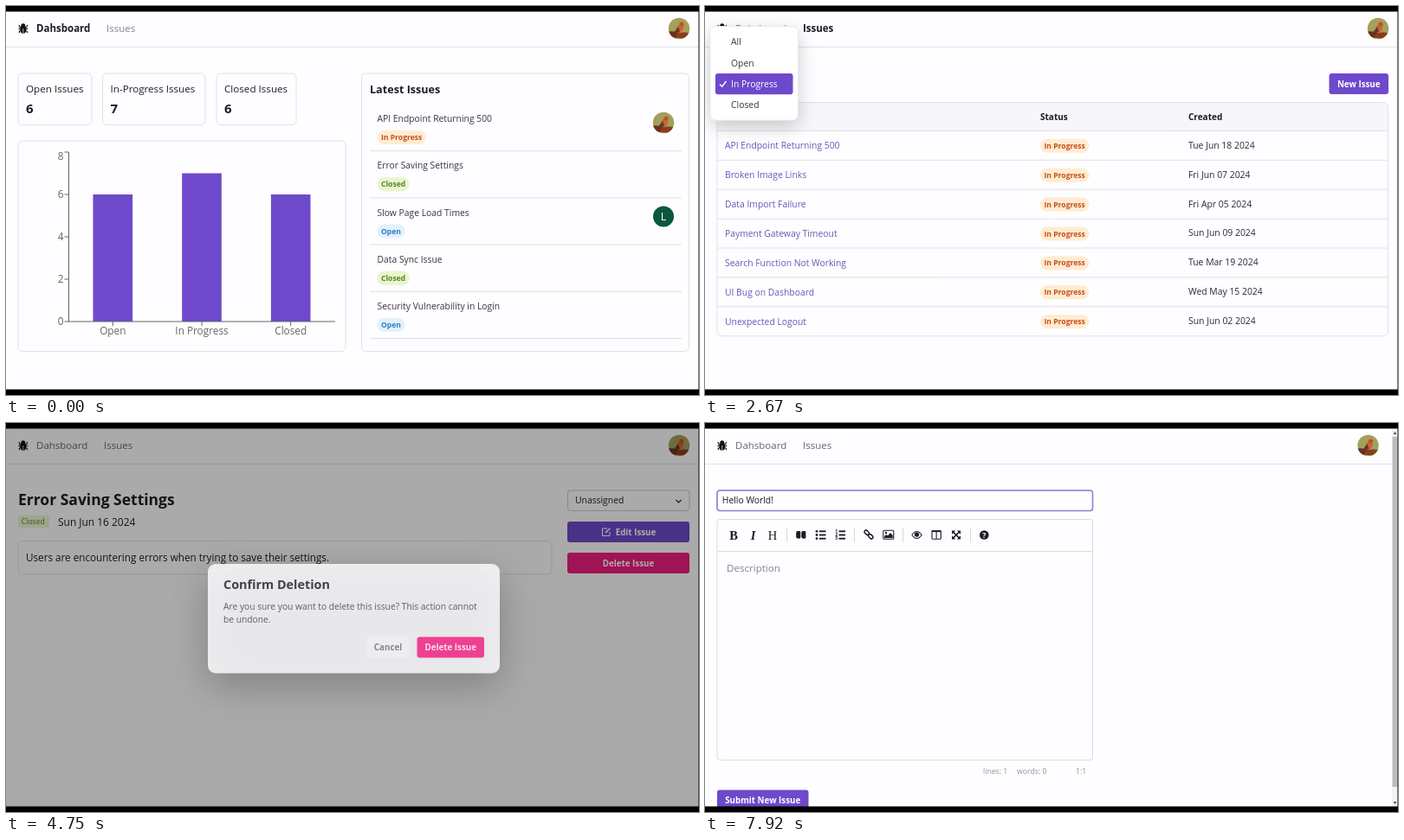
Write an HTML page with a canvas that moves like this. It is 800 px wide and 450 px high and loops after 8000 ms.

```html
<!DOCTYPE html>
<html lang="en">
<head>
<meta charset="utf-8">
<title>Issue tracker</title>
<style>
html, body { margin: 0; width: 100%; height: 100%; overflow: hidden; background: #000; }
canvas { display: block; width: 100vw; height: 100vh; }
</style>
</head>
<body>
<canvas id="stage" width="800" height="450"></canvas>
<script>
const ctx = document.getElementById('stage').getContext('2d');
const LOOP = 8000;
const PAPER = '#fefdff', INK = '#1f1d24', GRAY = '#68656e', LINE = '#e2e0e6', EDGE = '#c9c6ce';
const PURPLE = '#6e49cb', PINK = '#ee1c7e', LINK = '#6d57b6';
const SANS = '"Open Sans", "Noto Sans", sans-serif';
const SERIF = '"Liberation Serif", "Noto Serif", serif';

const BADGES = {
  Open: ['#e3f1fc', '#2f7cc6'],
  'In Progress': ['#ffecd0', '#c4501f'],
  Closed: ['#e9f5cd', '#5f7f28']
};

const toRows = (status, list) => list.map(s => {
  const [title, date] = s.split('|');
  return { title, date, status };
});
const OPEN = toRows('Open', [
  'Security Vulnerability in Login|Mon Jun 10 2024', 'Email Notification Failure|Wed Jun 05 2024',
  'Broken Link on Homepage|Sun Feb 25 2024', 'Slow Page Load Times|Wed Jun 12 2024',
  'Notification Delay|Fri Mar 22 2024', 'Server Overload|Mon May 27 2024']);
const PROGRESS = toRows('In Progress', [
  'API Endpoint Returning 500|Tue Jun 18 2024', 'Broken Image Links|Fri Jun 07 2024',
  'Data Import Failure|Fri Apr 05 2024', 'Payment Gateway Timeout|Sun Jun 09 2024',
  'Search Function Not Working|Tue Mar 19 2024', 'UI Bug on Dashboard|Wed May 15 2024',
  'Unexpected Logout|Sun Jun 02 2024']);
const CLOSED = toRows('Closed', [
  'Data Sync Issue|Tue Jun 11 2024', 'Error Saving Settings|Sun Jun 16 2024',
  'Missing Icons in Menu|Sat Apr 20 2024', 'Password Reset Loop|Thu May 09 2024',
  'Profile Picture Error|Mon Mar 04 2024', 'Typo on Contact Page|Fri May 03 2024']);
const ALL = [OPEN[0], PROGRESS[5], OPEN[1], CLOSED[3], PROGRESS[3], OPEN[2], CLOSED[0]];
const LATEST = [PROGRESS[0], CLOSED[1], OPEN[3], CLOSED[0], OPEN[0]];
const SORTED = [...OPEN].sort((a, b) => a.title < b.title ? -1 : 1);

const clamp = v => Math.max(0, Math.min(1, v));
const ramp = (t, from, to) => clamp((t - from) / (to - from));
const easeOut = u => 1 - (1 - u) * (1 - u);

// CSS "ease": cubic-bezier(.25, .1, .25, 1)
function ease(u) {
  let lo = 0, hi = 1, s = u;
  for (let i = 0; i < 14; i++) {
    s = (lo + hi) / 2;
    if (.75 * s * (1 - s) + s ** 3 < u) lo = s; else hi = s;
  }
  return u >= 1 ? 1 : .3 * s * (1 - s) ** 2 + 3 * s * s * (1 - s) + s ** 3;
}

function text(str, x, y, size = 10.35, color = INK, weight = 400, align = 'left', family = SANS) {
  ctx.font = `${weight} ${size}px ${family}`;
  ctx.fillStyle = color;
  ctx.textAlign = align;
  ctx.fillText(str, x, y);
}

function box(x, y, w, h, r, fill, stroke, width = 1) {
  ctx.beginPath();
  ctx.roundRect(x, y, w, h, r);
  if (fill) { ctx.fillStyle = fill; ctx.fill(); }
  if (stroke) { ctx.strokeStyle = stroke; ctx.lineWidth = width; ctx.stroke(); }
}

function line(color, width, ...pts) {
  ctx.beginPath();
  for (let i = 0; i < pts.length; i += 2) ctx.lineTo(pts[i], pts[i + 1]);
  ctx.strokeStyle = color;
  ctx.lineWidth = width;
  ctx.stroke();
}

function shape(color, ...pts) {
  ctx.beginPath();
  for (let i = 0; i < pts.length; i += 2) ctx.lineTo(pts[i], pts[i + 1]);
  ctx.fillStyle = color;
  ctx.fill();
}

function oval(x, y, rx, ry, color, turn = 0) {
  ctx.beginPath();
  ctx.ellipse(x, y, rx, ry, turn, 0, 7);
  ctx.fillStyle = color;
  ctx.fill();
}

function button(label, x, y, w, fill, color = '#fff', textX = x + w / 2) {
  box(x, y, w, 24, 3, fill);
  text(label, textX, y + 15.5, 9.8, color, 700, 'center');
}

function badge(status, x, y) {
  const [fill, color] = BADGES[status];
  ctx.font = `700 8.6px ${SANS}`;
  box(x, y - 8, ctx.measureText(status).width + 9, 16, 8, fill);
  text(status, x + 4.5, y + 3, 8.6, color, 700);
}

const chevron = (x, y) => line(INK, 1.1, x - 3, y - 1.5, x, y + 1.5, x + 3, y - 1.5);

function avatar(x, y) {
  ctx.save();
  ctx.beginPath();
  ctx.arc(x, y, 12.2, 0, 7);
  ctx.clip();
  ctx.fillStyle = '#a3a05c';
  ctx.fillRect(x - 13, y - 13, 26, 26);
  oval(x - 7, y + 7, 10, 3.6, '#6d2f1c', .1);
  oval(x + 5, y + 8, 9, 3.4, '#8a3d1e', -.1);
  oval(x + 1, y, 3.6, 5.6, '#d0622f', .5);
  oval(x + 3, y - 5, 2.6, 2.5, '#c4502c');
  shape('#5c3a2c', x - 1, y - 2, x + 1, y + 4, x - 7, y + 6);
  ctx.restore();
}

function bug(x, y) {
  for (const s of [-1, 1]) {
    line('#111', 1.1, x, y, x + s * 5.4, y + .4);
    line('#111', 1.1, x, y - 1, x + s * 4.2, y - 2, x + s * 4.8, y - 4.2);
    line('#111', 1.1, x, y + 2, x + s * 4.2, y + 3, x + s * 4.8, y + 5.2);
  }
  oval(x, y + 1.2, 3.4, 4.6, '#111');
  oval(x, y - 3.6, 2.5, 2.2, '#111');
  line(PAPER, .7, x, y, x, y + 5.5);
}

function nav(active, avatarX, hover) {
  line(LINE, 1, 0, 47.5, 800, 47.5);
  bug(19.8, 26);
  const dash = active === 'dash';
  text('Dahsboard', 35, 30, 11.5, dash ? INK : GRAY, dash ? 700 : 400);
  const list = active === 'list';
  text('Issues', dash ? 116 : 113, 30, 11.5, list || hover ? INK : dash ? '#85828b' : GRAY, list ? 700 : 400);
  avatar(avatarX, 26);
}

function dashboard(grow, hover) {
  nav('dash', 777, hover);
  const cards = [['Open Issues', 6, 14, 85], ['In-Progress Issues', 7, 111.5, 118.5], ['Closed Issues', 6, 243, 92]];
  for (const [label, count, x, w] of cards) {
    box(x, 78, w, 59.5, 5, null, LINE);
    text(label, x + 9, 100, 11.65, INK, 500);
    text(count, x + 9, 123.5, 15, INK, 700);
  }
  box(14, 156, 378, 243.5, 5, null, LINE);
  const bars = [['Open', 6], ['In Progress', 7], ['Closed', 6]];
  bars.forEach(([label, count], i) => {
    const x = 123.3 + i * 102.7, h = count * 24.5 * grow;
    ctx.fillStyle = PURPLE;
    ctx.fillRect(x - 22.8, 365 - h, 45.6, h);
    line('#666', 1, x, 365, x, 370);
    text(label, x, 379.5, 11.8, '#666', 400, 'center');
  });
  line('#666', 1, 72.5, 169, 72.5, 365);
  line('#666', 1, 72, 365, 380, 365);
  for (let v = 0; v <= 8; v += 2) {
    const y = 365 - v * 24.5;
    line('#666', 1, 67.5, y, 72.5, y);
    text(v, 66.5, (v === 8 ? 174 : y) + 4.3, 11.8, '#666', 400, 'right');
  }
  box(410.5, 78, 378, 321.5, 5, null, LINE);
  text('Latest Issues', 420, 101, 12.6, INK, 700);
  LATEST.forEach((row, i) => {
    const y = 130.3 + i * 54.25;
    text(row.title, 428.5, y + 3.8, 10.35, '#39363f');
    badge(row.status, 428.5, y + 21.7);
    line(LINE, 1, 420, y + 37.3, 780, y + 37.3);
  });
  avatar(759, 135);
  oval(759, 243.5, 12, 12, '#08573f');
  text('L', 759, 248, 12.5, '#fff', 400, 'center');
}

function issues(filter, rows, cols, sorted) {
  nav('list', 777);
  ctx.font = `400 10.35px ${SANS}`;
  const w = ctx.measureText(filter).width;
  box(14, 78, w + 29, 23.5, 3, null, EDGE);
  text(filter, 23, 93.3);
  chevron(w + 31, 90);
  button('New Issue', 720.5, 78, 68.5, PURPLE);
  box(14, 111.5, 774.5, 33, [6, 6, 0, 0], '#f7f6fa');
  const [statusX, dateX] = cols;
  text('Issue', 23, 131.5, 10, INK, 700);
  text('Status', statusX, 131.5, 10, INK, 700);
  text('Created', dateX, 131.5, 10, INK, 700);
  if (sorted) {
    line(INK, 1.1, 54.5, 132, 54.5, 124.5);
    line(INK, 1.1, 51.7, 127.3, 54.5, 124.5, 57.3, 127.3);
  }
  rows.forEach((row, i) => {
    const y = 161.4 + i * 33.9;
    line(LINE, 1, 14, y - 17, 788.5, y - 17);
    text(row.title, 23, y + 3.8, 10.35, LINK);
    badge(row.status, statusX, y + .4);
    text(row.date, dateX, y + 3.3, 10.4, '#2c2932');
  });
  box(14, 111.5, 774.5, 33 + rows.length * 33.9, 6, null, LINE);
}

// The chosen option always sits over the trigger.
function menu(chosen, hot = chosen, alpha = 1) {
  const items = ['All', 'Open', 'In Progress', 'Closed'];
  const top = 78 - items.indexOf(chosen) * 24.2;
  ctx.save();
  ctx.globalAlpha = alpha;
  ctx.shadowColor = 'rgba(0,0,0,.2)';
  ctx.shadowBlur = 22;
  ctx.shadowOffsetY = 7;
  box(6, top - 6, 101.5, 108.6, 6, '#fff');
  ctx.shadowColor = 'transparent';
  box(6, top - 6, 101.5, 108.6, 6, null, '#e9e7ec');
  items.forEach((item, i) => {
    const y = top + 12 + i * 24.2, on = item === hot, color = on ? '#fff' : '#3a3740';
    if (on) box(12, y - 12, 89.5, 24.2, 3, PURPLE);
    if (item === chosen) line(color, 1.5, 17, y + .5, 19.7, y + 3.2, 24.5, y - 3);
    text(item, 30, y + 3.8, 10.35, color);
  });
  ctx.restore();
}

function detail() {
  nav('', 777);
  text('Error Saving Settings', 14, 95, 17.5, INK, 700);
  box(14, 107, 36, 14, 3, BADGES.Closed[0]);
  text('Closed', 17.8, 117, 8.6, BADGES.Closed[1], 500);
  text('Sun Jun 16 2024', 60, 119, 11.95);
  box(14, 136.5, 616, 38.5, 5, null, LINE);
  text('Users are encountering errors when trying to save their settings.', 23, 160, 11.7);
  box(648.5, 78, 140.5, 23.5, 3, null, EDGE);
  text('Unassigned', 657, 93.3);
  chevron(776.5, 90.5);
  button('Edit Issue', 648, 114, 141, PURPLE, '#fff', 727);
  line('#fff', 1, 694, 122, 688.5, 122, 688.5, 130.5, 697, 130.5, 697, 126);
  line('#fff', 1.6, 692, 127, 697.3, 121.7);
  button('Delete Issue', 648, 150, 141, PINK);
}

function dialog(alpha) {
  ctx.save();
  ctx.fillStyle = `rgba(0,0,0,${.4 * alpha})`;
  ctx.fillRect(0, 0, 800, 450);
  ctx.globalAlpha = alpha;
  ctx.shadowColor = 'rgba(0,0,0,.3)';
  ctx.shadowBlur = 45;
  ctx.shadowOffsetY = 14;
  box(233, 163, 337, 126.5, 9, PAPER);
  ctx.shadowColor = 'transparent';
  text('Confirm Deletion', 251, 192, 14.4, INK, 700);
  text('Are you sure you want to delete this issue? This action cannot', 251, 216.3, 10.25, '#45424b');
  text('be undone.', 251, 231.3, 10.25, '#45424b');
  button('Cancel', 416, 247.5, 50, '#efedf2', '#716e78');
  button('Delete Issue', 474.5, 247.5, 77.5, PINK);
  ctx.restore();
}

function toolbar() {
  const y = 129.5;
  text('B', 33, 134.5, 14.5, INK, 700, 'center', SERIF);
  text('I', 55.5, 134.5, 14.5, INK, 'italic 700', 'center', SERIF);
  text('H', 78, 134.5, 14.5, INK, 400, 'center', SERIF);
  for (const x of [94.5, 172.5, 228.5, 306.5]) line('#d9d9d9', 1, x, 121, x, 138);

  for (const x of [105.3, 111.4]) {
    box(x, 125, 5, 5, 1.4, INK);
    line(INK, 1.5, x + .8, 128, x + 1.2, 132.2, x + 4, 133);
    box(x, 128.8, 5, 4.6, 1.4, INK);
  }
  for (let i = -1; i <= 1; i++) {
    const r = y + i * 4.2;
    oval(129, r, 1.4, 1.4, INK);
    line(INK, 1.9, 132, r, 139.5, r);
    text(i + 2, 150.3, r + 1.7, 5, INK, 700);
    line(INK, 1.9, 154.5, r, 162, r);
  }
  for (const s of [-1, 1]) {
    ctx.save();
    ctx.translate(189 + s * 2.3, 129 + s * 2.3);
    ctx.rotate(Math.PI / 4);
    box(-3, -1.9, 6, 3.8, 1.8, null, INK, 1.5);
    ctx.restore();
  }
  box(205.8, 124.3, 12, 10, 1, null, INK, 1.1);
  oval(209, 127, 1.2, 1.2, INK);
  shape(INK, 207, 133, 207, 131, 209.3, 129, 211, 130.5, 214, 127, 216.7, 130, 216.7, 133);
  ctx.beginPath();
  ctx.moveTo(238.8, y);
  ctx.quadraticCurveTo(244.5, y - 8, 250.2, y);
  ctx.quadraticCurveTo(244.5, y + 8, 238.8, y);
  ctx.strokeStyle = INK;
  ctx.lineWidth = 1.2;
  ctx.stroke();
  oval(244.5, y - .4, 2.7, 2.7, INK);
  box(262, 124.8, 10.3, 9.4, 1, null, INK, 1.1);
  line(INK, 1.1, 267.1, 125, 267.1, 134);
  line(INK, 1.8, 261.6, 125.2, 272.7, 125.2);
  for (const sx of [-1, 1]) for (const sy of [-1, 1]) {
    const cx = 290 + sx * 5, cy = y + sy * 5;
    line(INK, 1.7, 290, y, cx - sx, cy - sy);
    shape(INK, cx, cy, cx - sx * 4.2, cy, cx, cy - sy * 4.2);
  }
  oval(322.3, y, 5.3, 5.3, INK);
  text('?', 322.3, y + 3.2, 8.8, '#fff', 700, 'center');
}

function newIssue(focus, typed) {
  nav('', 765.5);
  box(14, 78, 433.5, 23.5, 3, null, EDGE);
  if (focus) {
    ctx.save();
    ctx.globalAlpha = focus;
    box(14, 78, 433.5, 23.5, 3, null, '#8f80d2', 1.6);
    ctx.restore();
  }
  text(typed || 'Title', 19.8, 93.3, 10.35, typed ? INK : '#8a8790');
  box(14, 111.5, 433.5, 278.5, 3, null, '#dcdade');
  line('#dcdade', 1, 14, 148.5, 447.5, 148.5);
  toolbar();
  text('Description', 25, 172, 11.6, '#85828b');
  text('lines: 1', 321, 405.5, 8.7, '#96949a');
  text('words: 0', 360, 405.5, 8.7, '#96949a');
  text('1:1', 428, 405.5, 8.7, '#96949a');
  button('Submit New Issue', 14, 424.5, 105.5, PURPLE);
  ctx.fillStyle = '#f3f2f4';
  ctx.fillRect(793, 7, 7, 436);
  ctx.fillStyle = '#bdbcbf';
  ctx.fillRect(793.5, 16, 6, 405);
  shape('#555', 794.5, 13, 796.5, 10, 798.5, 13);
  shape('#555', 794.5, 438, 796.5, 441, 798.5, 438);
}

function hint(path, alpha = 1) {
  const url = 'localhost:3000' + path;
  ctx.save();
  ctx.globalAlpha = alpha;
  ctx.font = `400 7.9px ${SANS}`;
  box(0, 433, ctx.measureText(url).width + 5.5, 11, [0, 3, 0, 0], '#30282b');
  text(url, 1, 442.6, 7.9, '#f1eef0');
  ctx.restore();
}

function scene(t) {
  if (t < 500) {
    dashboard(1, t >= 330);
    if (t >= 330) hint('/issues', ramp(t, 290, 400));
  } else if (t < 920) {
    issues('All', ALL, [387, 558]);
    if (t < 640) hint('/issues', 1 - ramp(t, 560, 640));
    if (t >= 660) menu('All', t < 780 ? 'All' : 'Open', ramp(t, 620, 720));
  } else if (t < 2250) {
    const sorted = t >= 1400;
    issues('Open', sorted ? SORTED : OPEN, [416, 540], sorted);
    if (t >= 1170 && t < 1750) hint('/issues?status=OPEN&orderBy=title', ramp(t, 1120, 1250) * (1 - ramp(t, 1640, 1750)));
    if (t >= 2000) menu('Open', t < 2120 ? 'Open' : 'In Progress', ramp(t, 1960, 2060));
  } else if (t < 2870) {
    issues('In Progress', PROGRESS, [387, 558], true);
    if (t >= 2540) menu('In Progress', t < 2780 ? 'In Progress' : 'Closed', ramp(t, 2500, 2600));
  } else if (t < 3183) {
    issues('Closed', CLOSED, [410, 545], true);
    if (t >= 3050) hint('', ramp(t, 3020, 3120));
  } else if (t < 4000) {
    dashboard(ease(ramp(t, 3183, 3783)));
    hint(t < 3660 ? '' : '/issues/21');
  } else if (t < 5080) {
    detail();
    if (t < 4400) hint('/issues/21', 1 - ramp(t, 4250, 4400));
    if (t >= 4560) dialog(easeOut(ramp(t, 4560, 4890)));
  } else if (t < 5880) {
    issues('All', ALL, [387, 558]);
    if (t < 5250) dialog(1 - easeOut(ramp(t, 5080, 5250)));
    if (t >= 5600) hint('/issues/new', ramp(t, 5580, 5680));
  } else {
    const count = t < 7400 ? 0 : Math.floor((t - 7400) / 43) + 1;
    newIssue(ramp(t, 6300, 6400), 'Hello World!'.slice(0, count));
    if (t < 6130) hint('/issues/new', 1 - ramp(t, 5900, 6130));
  }
}

function draw(now) {
  const t = now % LOOP;
  ctx.fillStyle = PAPER;
  ctx.fillRect(0, 0, 800, 450);
  scene(t);
  ctx.fillStyle = '#000';
  ctx.fillRect(0, 0, 800, 6.5);
  ctx.fillRect(0, 443.5, 800, 6.5);
  ctx.fillStyle = 'rgba(20,18,22,.75)';
  ctx.fillRect(799.2, 0, .8, 450);
}

const start = performance.now();
function tick() {
  draw(performance.now() - start);
  requestAnimationFrame(tick);
}
tick();
</script>
</body>
</html>
```
